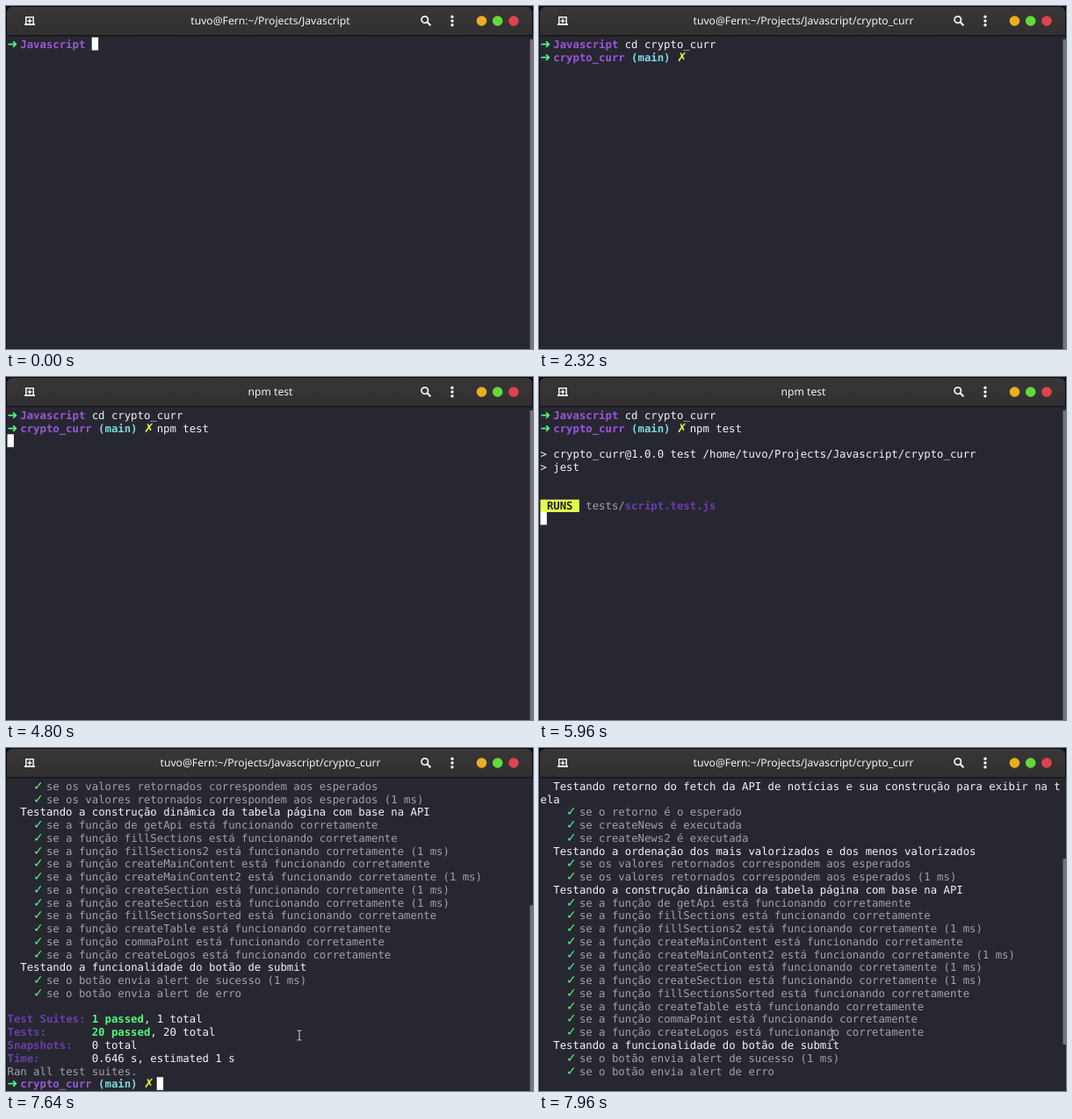
These frames come from a looping animation (600x391 px, 8 s). An HTML page with a canvas:

```html
<!DOCTYPE html>
<html lang="pt">
<head>
<meta charset="utf-8">
<title>Terminal</title>
<style>
html, body { margin: 0; width: 100%; height: 100%; overflow: hidden; background: #272731; }
canvas { display: block; }
</style>
</head>
<body>
<canvas id="stage" width="600" height="391"></canvas>
<script>
const ctx = document.getElementById('stage').getContext('2d');
const LOOP = 8000, STEP = 40;
const LEFT = 1.5, TOP = 36.4, CELL = 7.4, ROW = 14.76;
const MONO = '12.3px "DejaVu Sans Mono", monospace';
const SYMBOL = '14px "DejaVu Sans", sans-serif';
const C = {
  bg: '#272731', edge: '#171619', white: '#f4f4f4', dim: '#a2a1a6',
  green: '#50fa7b', purple: '#9a58d8', violet: '#6b3fa9', cyan: '#7fd9df',
  yellow: '#dcf63c', runs: '#e2fa4e', scroll: '#787578'
};

const HOME = 'tuvo@Fern:~/Projects/Javascript';
const PROJECT = HOME + '/crypto_curr';

// A segment is [column, text, colour, bold, font]
const seg = (col, text, color = C.white, bold = false, font = MONO) => [col, text, color, bold, font];
const arrow = seg(0, '➜', C.green, true, SYMBOL);
const homePrompt = cmd => [arrow, seg(2, 'Javascript', C.purple, true), seg(13, cmd)];
const gitPrompt = cmd => [
  arrow, seg(2, 'crypto_curr', C.purple, true), seg(14, '(main)', C.cyan, true),
  seg(21, '✗', C.yellow, true, SYMBOL), seg(23, cmd)
];
const group = text => [seg(2, text)];
const pass = text => [seg(4, '✓', C.green, false, SYMBOL), seg(6, 'se ' + text, C.dim)];
const works = (name, end = '') => pass(`a função ${name} está funcionando corretamente${end}`);
const total = (label, count, rest) => [
  seg(0, label, C.violet, true), seg(13, count, C.green, true), seg(13 + count.length, rest)
];

const npmHeader = [
  [],
  [seg(0, '> crypto_curr@1.0.0 test /home/tuvo/Projects/Javascript/crypto_curr')],
  [seg(0, '> jest')],
  [], []
];
const runsLine = [seg(1, 'RUNS', '#20201c', true), seg(7, 'tests/', C.dim), seg(13, 'script.test.js', C.violet, true)];
runsLine.badge = true;

const MS = ' (1 ms)';
const report = [
  group('Testando retorno do fetch da API de notícias e sua construção para exibir na t'),
  [seg(0, 'ela')],
  pass('o retorno é o esperado'),
  pass('createNews é executada'),
  pass('createNews2 é executada'),
  group('Testando a ordenação dos mais valorizados e dos menos valorizados'),
  pass('os valores retornados correspondem aos esperados'),
  pass('os valores retornados correspondem aos esperados' + MS),
  group('Testando a construção dinâmica da tabela página com base na API'),
  works('de getApi'),
  works('fillSections'),
  works('fillSections2', MS),
  works('createMainContent'),
  works('createMainContent2', MS),
  works('createSection', MS),
  works('createSection', MS),
  works('fillSectionsSorted'),
  works('createTable'),
  works('commaPoint'),
  works('createLogos'),
  group('Testando a funcionalidade do botão de submit'),
  pass('o botão envia alert de sucesso' + MS),
  pass('o botão envia alert de erro'),
  [],
  total('Test Suites:', '1 passed', ', 1 total'),
  total('Tests:', '20 passed', ', 20 total'),
  total('Snapshots:', '', '0 total'),
  total('Time:', '', '0.646 s, estimated 1 s'),
  [seg(0, 'Ran all test suites.', C.dim)]
];
const REPORT_AT = 10, LINES = 40, ROWS = 24;

const T = {
  tab: 1120, cd: 1720, npm: 4720, header: 5080, runs: 5480,
  done: 6080, prompt: 6280, mouse: 6800, scroll: 7680
};
const cdKeys = [200, 320, 440, 640, 760, 920];
const npmKeys = [2880, 3040, 3160, 3360, 3520, 3720, 3800, 3880];
const typed = (text, keys, t) => text.slice(0, keys.filter(k => k <= t).length);

// Times at which the cursor is hidden by its blink
const hidden = [[40, 200], [2300, 2880], [4520, 4720], [5320, 5920], [6480, 7080], [7680, 8000]];
const cursorOn = t => !hidden.some(([a, b]) => t >= a && t < b);

function screen(t) {
  if (t >= T.done) {
    const lines = [];
    report.forEach((line, i) => lines[REPORT_AT + i] = line);
    const ready = t >= T.prompt;
    lines[LINES - 1] = ready ? gitPrompt('') : [];
    const up = t < T.scroll ? 0 : Math.min(6, 1 + Math.floor((t - T.scroll) / STEP));
    return {
      lines, first: LINES - ROWS - up, count: LINES,
      cursor: [ready ? 23 : 0, LINES - 1], title: ready ? PROJECT : 'npm test'
    };
  }
  if (t < T.cd) {
    const cmd = t < T.tab ? typed('cd cry', cdKeys, t) : 'cd crypto_curr/';
    return { lines: [homePrompt(cmd)], first: 0, count: ROWS, cursor: [13 + cmd.length, 0], title: HOME };
  }
  const cmd = typed('npm test', npmKeys, t);
  const lines = [homePrompt('cd crypto_curr'), gitPrompt(cmd)];
  let cursor = [23 + cmd.length, 1];
  if (t >= T.npm) cursor = [0, 2];
  if (t >= T.header) {
    lines.push(...npmHeader);
    cursor = [0, 6];
  }
  if (t >= T.runs) {
    lines.push(runsLine);
    cursor = [0, 8];
  }
  return { lines, first: 0, count: ROWS, cursor, title: t < T.npm ? PROJECT : 'npm test' };
}

function rect(x, y, w, h, color) {
  ctx.fillStyle = color;
  ctx.fillRect(x, y, w, h);
}

function disc(x, y, r, color) {
  ctx.fillStyle = color;
  ctx.beginPath();
  ctx.arc(x, y, r, 0, Math.PI * 2);
  ctx.fill();
}

function stroke(points, color, width) {
  ctx.strokeStyle = color;
  ctx.lineWidth = width;
  ctx.beginPath();
  points.forEach(([x, y, jump]) => jump ? ctx.moveTo(x, y) : ctx.lineTo(x, y));
  ctx.stroke();
}

function drawTerminal(s, t) {
  ctx.save();
  ctx.beginPath();
  ctx.rect(0, 34, 600, 357);
  ctx.clip();
  ctx.textAlign = 'left';
  for (let r = 0; r < ROWS; r++) {
    const line = s.lines[s.first + r];
    if (!line) continue;
    const y = TOP + r * ROW;
    if (line.badge) rect(LEFT, y, 6 * CELL, 14.3, C.runs);
    for (const [col, text, color, bold, font] of line) {
      ctx.font = (bold ? 'bold ' : '') + font;
      ctx.fillStyle = color;
      ctx.fillText(text, LEFT + col * CELL, y + 11.4);
    }
  }
  if (cursorOn(t)) {
    const [col, row] = s.cursor;
    rect(LEFT + col * CELL, TOP - 0.7 + (row - s.first) * ROW, CELL, ROW, '#ffffff');
  }
  const track = 353;
  rect(596.5, 38 + track * s.first / s.count, 3.5, track * ROWS / s.count, C.scroll);
  ctx.restore();
}

function drawBar(title) {
  rect(0, 0, 600, 34, '#0c0b0d');
  const shade = ctx.createLinearGradient(0, 1, 0, 33);
  shade.addColorStop(0, '#383637');
  shade.addColorStop(1, '#322f31');
  ctx.fillStyle = shade;
  ctx.beginPath();
  ctx.roundRect(1, 1, 598, 33, [6, 6, 0, 0]);
  ctx.fill();
  rect(0, 33, 600, 1.5, C.edge);
  rect(0, 34, 1, 357, C.edge);

  ctx.font = '12.15px "Noto Sans", sans-serif';
  ctx.textAlign = 'center';
  ctx.fillStyle = C.white;
  ctx.fillText(title, 301, 21);

  // New tab
  stroke([[21, 21, 1], [33, 21]], C.white, 1.8);
  stroke([[22.8, 21, 1], [22.8, 12.7], [31.2, 12.7], [31.2, 21]], C.white, 1.5);
  stroke([[24.5, 17, 1], [29.5, 17], [27, 14.5, 1], [27, 19.5]], C.white, 1.5);
  // Search
  ctx.strokeStyle = C.white;
  ctx.lineWidth = 1.8;
  ctx.beginPath();
  ctx.arc(476.8, 15.6, 3.7, 0, Math.PI * 2);
  ctx.stroke();
  stroke([[479.5, 18.3, 1], [483.4, 22.2]], C.white, 2.2);
  // Menu
  [12.2, 17, 21.8].forEach(y => disc(508, y, 1.7, C.white));
  // Window buttons
  disc(541.5, 17, 5.8, '#e8b020');
  disc(559.7, 17, 5.8, '#5fdc38');
  disc(578, 17, 5.8, '#e0434d');
}

function drawMouse(t) {
  if (t < T.mouse) return;
  const p = Math.min(1, (t - T.mouse) / 680);
  const left = Math.pow(1 - p, 2);
  const x = 334 + 163 * left, y = 327.5 + 70 * left;
  const beam = [
    [x - 2.5, y - 5.5, 1], [x - 0.8, y - 5.5], [x, y - 4.7], [x + 0.8, y - 5.5], [x + 2.5, y - 5.5],
    [x, y - 4.7, 1], [x, y + 4.7],
    [x - 2.5, y + 5.5, 1], [x - 0.8, y + 5.5], [x, y + 4.7], [x + 0.8, y + 5.5], [x + 2.5, y + 5.5]
  ];
  stroke(beam, '#17171c', 2.4);
  stroke(beam, '#d4d4d6', 1.1);
}

function draw(now) {
  const t = Math.floor((now % LOOP) / STEP) * STEP;
  const s = screen(t);
  ctx.textRendering = 'geometricPrecision';
  rect(0, 0, 600, 391, C.bg);
  drawTerminal(s, t);
  drawBar(s.title);
  drawMouse(t);
}

const start = performance.now();
function loop() {
  draw(performance.now() - start);
  requestAnimationFrame(loop);
}
loop();
</script>
</body>
</html>
```
